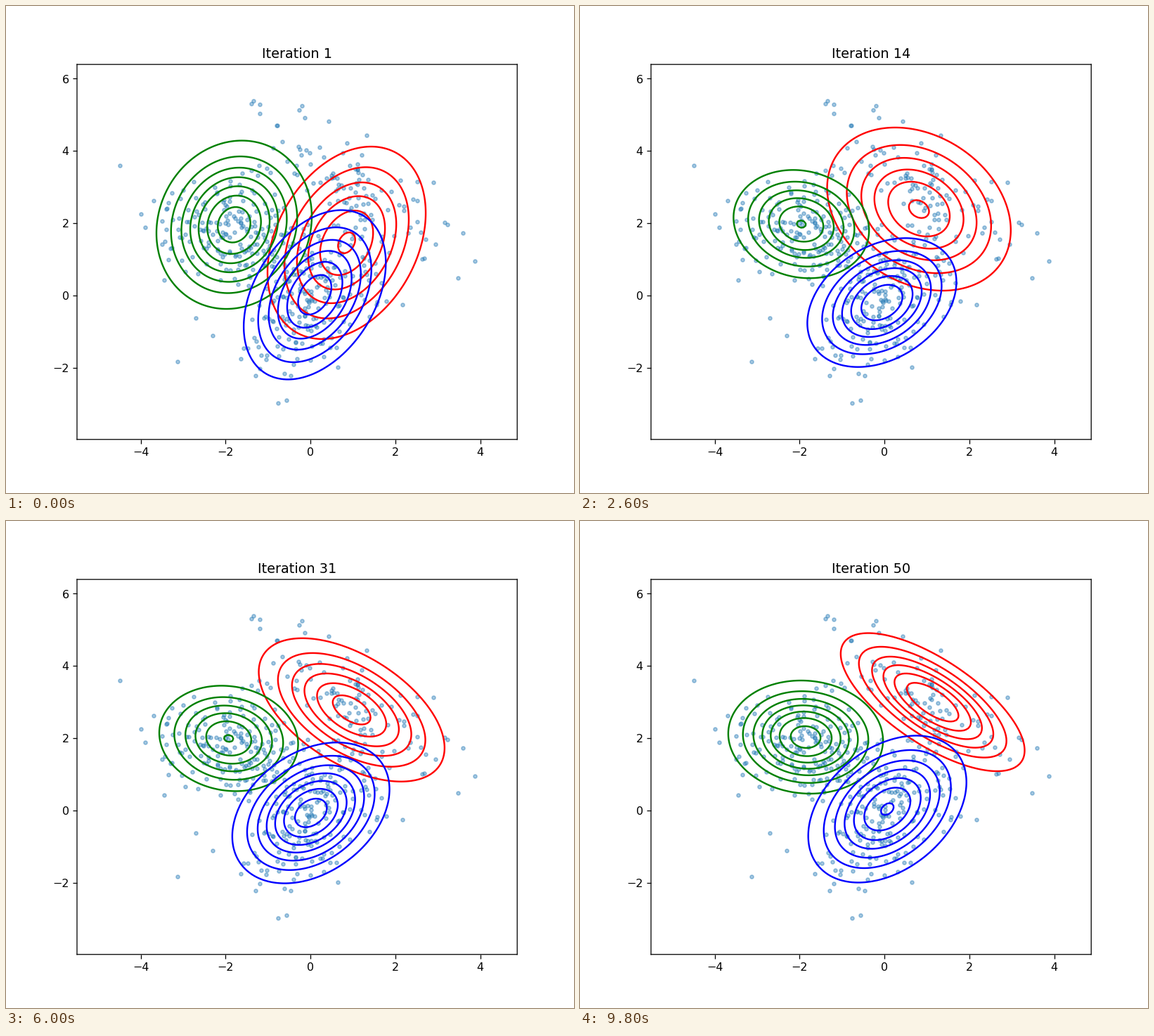
Write a matplotlib script that moves like this. It is 808 px wide and 693 px high and loops after 10000 ms.

```python
import numpy as np
import matplotlib.pyplot as plt
from matplotlib.animation import FuncAnimation

W, H, DPI = 808, 693, 115.5
XLIM, YLIM = (-5.5, 4.868), (-3.967, 6.395)
FRAMES, INTERVAL = 50, 200


def warp(n):
    """Fitting time: steps shrink as the iterations converge."""
    return np.log(n + 2.0)


# Gaussians at a few iterations: mean x, mean y, sigma x, sigma y, correlation
KNOTS = warp(np.array([1, 6, 20, 50]))
FITS = {
    "red": np.array([
        [0.85, 1.466, 0.978, 1.396, 0.31],
        [0.81, 1.965, 1.071, 1.393, 0.0],
        [0.85, 2.587, 1.148, 1.09, -0.38],
        [1.134, 3.004, 1.098, 0.967, -0.70],
    ]),
    "green": np.array([
        [-1.80, 1.965, 0.906, 1.152, 0.10],
        [-1.89, 2.013, 0.884, 0.875, -0.05],
        [-1.968, 1.978, 0.835, 0.77, -0.13],
        [-1.858, 2.039, 0.906, 0.777, -0.06],
    ]),
    "blue": np.array([
        [0.10, 0.03, 0.859, 1.201, 0.377],
        [-0.078, -0.217, 0.876, 0.921, 0.358],
        [-0.035, -0.137, 0.901, 0.924, 0.315],
        [0.066, 0.049, 0.941, 1.025, 0.366],
    ]),
}
COUNTS = {"red": 90, "green": 180, "blue": 205}

# Lone points far from every cluster
OUTLIERS = [
    (-4.49, 3.61), (-4.0, 2.26), (-1.39, 5.32), (-1.34, 5.39), (-1.2, 5.3),
    (-0.26, 5.14), (-0.21, 5.25), (-0.14, 4.92), (-0.66, 4.27), (2.9, 3.14),
    (3.16, 2.03), (3.23, 1.97), (3.59, 1.74), (3.87, 0.97), (3.47, 0.49),
    (2.17, -0.25), (0.64, -1.98), (-0.76, -2.97), (-0.56, -2.88),
    (-1.29, -2.2), (-3.14, -1.82), (-2.7, -0.62), (-2.3, -1.1), (-3.45, 0.43),
]


def cluster(rng, n, params, reach=2.3):
    """Draw n points of a Gaussian, cut off at a number of sigmas."""
    mx, my, sx, sy, rho = params
    z = rng.standard_normal((2 * n, 2))
    a, b = z[np.hypot(z[:, 0], z[:, 1]) < reach][:n].T
    y = rho * a + np.sqrt(1 - rho**2) * b
    return np.column_stack([mx + sx * a, my + sy * y])


def params_at(table, n):
    """Cubic Hermite interpolation between the known fits."""
    slopes = np.gradient(table, KNOTS, axis=0)
    u = warp(n)
    i = min(np.searchsorted(KNOTS, u, side="right") - 1, len(KNOTS) - 2)
    h = KNOTS[i + 1] - KNOTS[i]
    t = (u - KNOTS[i]) / h
    return ((1 + 2 * t) * (1 - t)**2 * table[i]
            + t * (1 - t)**2 * h * slopes[i]
            + t**2 * (3 - 2 * t) * table[i + 1]
            + t**2 * (t - 1) * h * slopes[i + 1])


def density(x, y, params):
    mx, my, sx, sy, rho = params
    a, b = (x - mx) / sx, (y - my) / sy
    q = 1 - rho**2
    d2 = (a * a - 2 * rho * a * b + b * b) / q
    return np.exp(-d2 / 2) / (2 * np.pi * sx * sy * np.sqrt(q))


rng = np.random.default_rng(7)
points = np.vstack([OUTLIERS] + [cluster(rng, COUNTS[c], FITS[c][-1])
                                 for c in FITS])

fig, ax = plt.subplots(figsize=((W + 0.01) / DPI, (H + 0.01) / DPI), dpi=DPI)
ax.scatter(points[:, 0], points[:, 1], s=10, alpha=0.4)
title = ax.set_title("")
for spine in ax.spines.values():
    spine.set_snap(False)

gx, gy = np.meshgrid(np.linspace(*XLIM, 180), np.linspace(*YLIM, 180))
contours = []


def draw(frame):
    n = frame + 1
    while contours:
        contours.pop().remove()
    for color, table in FITS.items():
        z = density(gx, gy, params_at(table, n))
        contours.append(ax.contour(gx, gy, z, colors=color))
    ax.set(xlim=XLIM, ylim=YLIM)
    title.set_text(f"Iteration {n}")
    return [title]


anim = FuncAnimation(fig, draw, frames=FRAMES, interval=INTERVAL, repeat=True)
plt.show()
```
